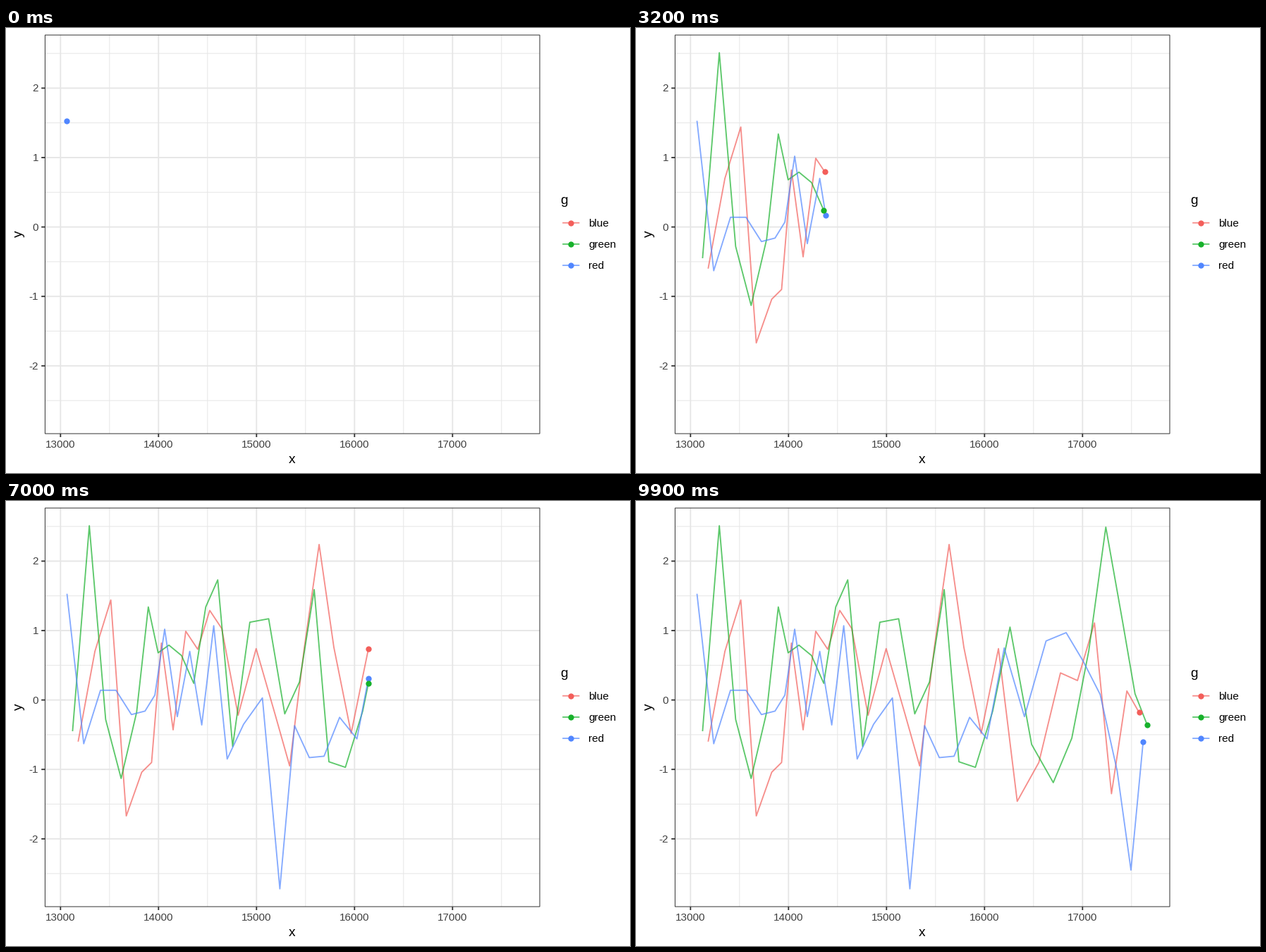
Animation of 885 by 632 pixels, one loop 10 s. Source, as a matplotlib script:

```python
import numpy as np
import matplotlib.pyplot as plt
from matplotlib.animation import FuncAnimation
from matplotlib.patches import Rectangle

W, H, DPI = 885, 632, 100
FRAMES, INTERVAL = 100, 100
PX = 72 / DPI  # points per pixel

LEFT, RIGHT, TOP, BOTTOM = 55, 757, 9.6, 576.2
THIN, THICK = 1.0, 1.86
GRID, DARK, TEXT = "#e6e6e6", "#333333", "#404040"
SALMON, GREEN, BLUE = "#f35e5a", "#17b12b", "#5086ff"
ALPHA = 0.7

plt.rcParams["font.family"] = "Liberation Sans"

# Random readings per group, drawn as they are.
READINGS = {
    "red": [1.53, -.63, .14, .14, -.21, -.16, .07, 1.02, -.24, .7,
            -.36, 1.07, -.85, -.35, .03, -2.72, -.37, -.83, -.81, -.25,
            -.56, .75, -.24, .85, .97, .56, .08, -1.02, -2.45, -.6],
    "green": [-.45, 2.51, -.28, -1.13, -.18, 1.34, .68, .79, .64, .24,
              1.34, 1.73, -.67, 1.12, 1.17, -.2, .26, 1.59, -.89, -.97,
              -.16, 1.05, -.64, -1.19, -.55, .71, 2.49, 1.11, .09, -.36],
    "blue": [-.6, .7, 1.44, -1.67, -1.04, -.9, .82, -.43, .99, .73,
             1.29, 1.03, -.22, .74, -.2, -.95, .76, 2.24, .76, -.48,
             .74, -1.46, -.9, .39, .28, 1.11, -1.35, .13, -.18],
}
COLORS = {"blue": SALMON, "green": GREEN, "red": BLUE}

# The groups take turns along x; the pace changes only at a few samples.
COUNT = sum(map(len, READINGS.values()))
PACE = [(0, 13066), (6, 13408), (14, 13829), (21, 14063), (26, 14278),
        (35, 14645), (39, 14868), (44, 15188), (56, 15789), (64, 16260),
        (71, 16775), (82, 17411), (88, 17660)]
ORDER = np.arange(COUNT)
X = np.interp(ORDER, *zip(*PACE))

# Each sample is reached on a whole frame; poses between are linear.
WHEN = np.round(ORDER * (FRAMES - 1) / (COUNT - 1))

fig = plt.figure(figsize=(W / DPI, H / DPI), dpi=DPI, facecolor="white")
ax = fig.add_axes([0, 0, 1, 1])
ax.set_xlim(0, W)
ax.set_ylim(H, 0)
ax.axis("off")


def stroke(xs, ys, color, width, z, alpha=1):
    line, = ax.plot(xs, ys, color=color, lw=width * PX, alpha=alpha, zorder=z,
                    solid_capstyle="butt", solid_joinstyle="round", snap=False)
    return line


def dot(xs, ys, color):
    point, = ax.plot(xs, ys, "o", color=color, ms=8.3 * PX, mew=0, zorder=6,
                     snap=False)
    return point


def label(x, y, s, size, color="black", ha="left", rotation=0):
    ax.text(x, y, s, fontsize=size * PX, color=color, ha=ha, va="baseline",
            rotation=rotation, rotation_mode="anchor")


def x_pos(v):
    return 77.3 + (v - 13000) * 0.139


def y_pos(v):
    return 282.6 - v * 98.6


def draw_axes():
    for v in np.arange(13500, 18000, 1000):
        stroke([x_pos(v)] * 2, [TOP, BOTTOM], GRID, THIN, 1)
    for v in np.arange(-2.5, 3):
        stroke([LEFT, RIGHT], [y_pos(v)] * 2, GRID, THIN, 1)
    for v in range(13000, 18000, 1000):
        x = x_pos(v)
        stroke([x, x], [TOP, BOTTOM], GRID, THICK, 2)
        stroke([x, x], [BOTTOM, BOTTOM + 4.8], DARK, THICK, 2)
        label(x, 596, str(v), 15.3, TEXT, "center")
    for v in range(-2, 3):
        y = y_pos(v)
        stroke([LEFT, RIGHT], [y, y], GRID, THICK, 2)
        stroke([LEFT - 4.8, LEFT], [y, y], DARK, THICK, 2)
        label(46.2, y + 4.9, str(v), 15.3, TEXT, "right")
    ax.add_patch(Rectangle((LEFT + 0.4, TOP + 0.4), RIGHT - LEFT - 0.4,
                           BOTTOM - TOP - 0.5, fill=False, ec=DARK,
                           lw=THIN * PX, zorder=7, snap=False))
    label(405.8, 618.5, "x", 19.1, ha="center")
    label(22.5, 292.5, "y", 19.1, ha="center", rotation=90)


def draw_legend():
    label(786, 250.3, "g", 19.1)
    for i, (name, color) in enumerate(COLORS.items()):
        y = 276.7 + 30.2 * i
        stroke([789.2, 813.4], [y, y], color, THICK, 5, ALPHA)
        dot([801.3], [y], color)
        label(826, y + 5.2, name, 15.3)


class Series:
    def __init__(self, turn, name):
        self.when = WHEN[turn::3]
        self.x = x_pos(X[turn::3])
        self.y = y_pos(np.array(READINGS[name]))
        self.line = stroke([], [], COLORS[name], THICK, 5 - turn, ALPHA)
        self.head = dot([], [], COLORS[name])

    def show(self, t):
        if t < self.when[0]:
            self.line.set_data([], [])
            self.head.set_data([], [])
            return
        hx = np.interp(t, self.when, self.x)
        hy = np.interp(t, self.when, self.y)
        past = self.when < t
        self.line.set_data(np.append(self.x[past], hx),
                           np.append(self.y[past], hy))
        self.head.set_data([hx], [hy])


draw_axes()
draw_legend()
series = [Series(turn, name) for turn, name in enumerate(READINGS)]


def update(t):
    for s in series:
        s.show(t)
    return [a for s in series for a in (s.line, s.head)]


anim = FuncAnimation(fig, update, frames=FRAMES, interval=INTERVAL,
                     init_func=lambda: update(0), repeat=True, repeat_delay=0)
plt.show()
```
